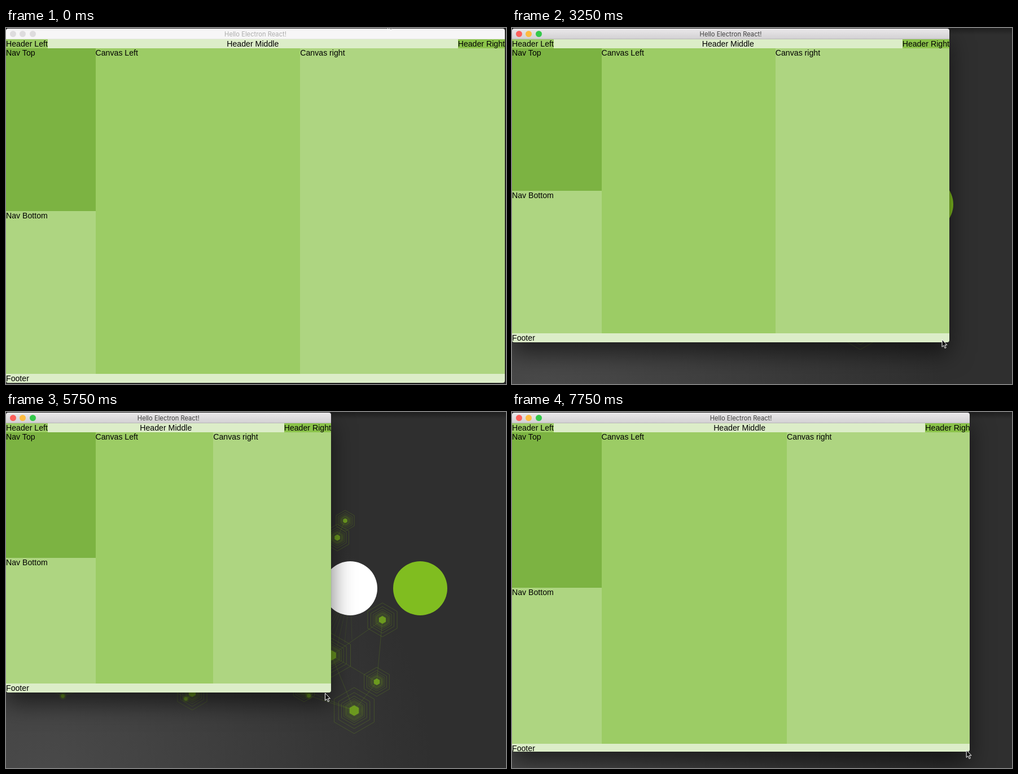
Animation of 886 by 632 pixels, one loop 8 s. Source, as an HTML page with a canvas:

```html
<!DOCTYPE html>
<html lang="en">
<head>
<meta charset="utf-8">
<title>Resizable layout</title>
<style>
  html, body { margin: 0; width: 100%; height: 100%; overflow: hidden; background: #2f2f2f; }
  #stage { position: relative; width: 886px; height: 632px; overflow: hidden; }
  #desktop, #cursor { position: absolute; left: 0; top: 0; }
  #cursor { overflow: visible; }
  #window {
    position: absolute; left: 0; top: 1px; overflow: hidden; border-radius: 4px;
    box-shadow: 0 20px 42px rgba(0,0,0,.55), 0 0 1px rgba(0,0,0,.6);
  }
  #title {
    position: absolute; left: 0; top: 0; width: 100%; height: 19px; box-sizing: border-box;
    background: linear-gradient(#ebe9eb, #d3d1d3); border-bottom: 1px solid #b9b7b9;
    font: 11.2px/20px Inter, sans-serif; color: #3c3c3c; text-align: center; white-space: nowrap;
  }
  #title i { position: absolute; top: 4px; width: 11px; height: 11px; border-radius: 50%; }
  .inactive #title { background: #f7f6f7; border-color: #e4e6e0; color: #acacac; }
  .inactive #title i { background: #dedcde !important; }
  #content {
    position: absolute; left: 0; top: 19px; display: flex; flex-direction: column;
    font: 14.15px/16px "Liberation Sans", Arial, sans-serif; color: #000; white-space: nowrap;
  }
  #header, #main { display: flex; }
  #header, #footer { flex: 0 0 16px; background: #dcedc8; }
  #main { flex: 1; }
  #nav { flex: 0 0 158.5px; display: flex; flex-direction: column; }
  .grow { flex: 1 1 0; }
  .c300 { background: #aed581; }
  .c400 { background: #9ccc65; }
  .c500 { background: #8bc34a; }
  .c600 { background: #7cb342; }
</style>
</head>
<body>
<div id="stage">
  <canvas id="desktop" width="886" height="632"></canvas>
  <div id="window">
    <div id="title">
      <i style="left:6.5px;background:#fc605b"></i>
      <i style="left:24px;background:#fdbc40"></i>
      <i style="left:42px;background:#34c84a"></i>
      Hello Electron React!
    </div>
    <div id="content">
      <div id="header">
        <div class="c400">Header Left</div>
        <div class="grow" style="text-align:center">Header Middle</div>
        <div class="c500">Header Right</div>
      </div>
      <div id="main">
        <div id="nav">
          <div class="grow c600">Nav Top</div>
          <div class="grow c300">Nav Bottom</div>
        </div>
        <div class="grow c400">Canvas Left</div>
        <div class="grow c300">Canvas right</div>
      </div>
      <div id="footer">Footer</div>
    </div>
  </div>
  <svg id="cursor" width="12" height="18">
    <path d="M.5 .5V13.6L3.4 10.9 5.5 15.8 7.6 14.9 5.5 10.1H9.4Z" fill="#111" stroke="#fff" stroke-width="1"/>
  </svg>
</div>
<script>
const $ = id => document.getElementById(id);
const ctx = $('desktop').getContext('2d');
const LOOP = 8000, STEP = 250, ACTIVATE = 1000, GRAB = 2250;
const LEAD = 30; // ms by which pointer and content run ahead of the window frame

// Key points: time, x, y
const pointerPath = [[0, 676, -13], [500, 798, 257], [1000, 798, 257], [2000, 872, 640]];
const cornerPath = [
  [2540, 884, 630], [2750, 852, 612], [3250, 775, 557.5], [3750, 734, 543],
  [4550, 734, 543], [4750, 698.5, 521.5], [5250, 567, 422], [6250, 584, 574], [LOOP, 849, 608]
];

function along(path, t) {
  const next = path.findIndex(key => key[0] > t);
  if (next <= 0) return path.at(next).slice(1);
  const [t0, x0, y0] = path[next - 1], [t1, x1, y1] = path[next];
  const k = (t - t0) / (t1 - t0);
  return [x0 + (x1 - x0) * k, y0 + (y1 - y0) * k];
}

const noise = k => Math.abs(Math.sin(k * 12.99 + 4) * 43758.5) % 1;

function hexagon(x, y, r) {
  ctx.beginPath();
  for (let k = 0; k < 6; k++) {
    const a = Math.PI / 6 + k * Math.PI / 3;
    ctx.lineTo(x + r * Math.cos(a), y + r * Math.sin(a));
  }
  ctx.closePath();
}

function line(x1, y1, x2, y2) {
  ctx.beginPath();
  ctx.moveTo(x1, y1);
  ctx.lineTo(x2, y2);
  ctx.stroke();
}

function disc(x, y, r, color) {
  ctx.fillStyle = color;
  ctx.beginPath();
  ctx.arc(x, y, r, 0, 2 * Math.PI);
  ctx.fill();
}

function gradientFill(gradient, from, to) {
  gradient.addColorStop(0, from);
  gradient.addColorStop(1, to);
  ctx.fillStyle = gradient;
}

function drawNode([x, y, r], ringed) {
  const glow = ringed ? .3 : .5;
  gradientFill(ctx.createRadialGradient(x, y, r * .6, x, y, r * 2), `rgba(110,165,20,${glow})`, 'rgba(110,165,20,0)');
  ctx.fillRect(x - 2 * r, y - 2 * r, 4 * r, 4 * r);
  ctx.strokeStyle = 'rgba(115,160,25,.4)';
  for (let k = 0; k < 6 && ringed; k++) {
    hexagon(x, y, r * (1 + 3.3 * .72 ** k));
    ctx.stroke();
  }
  ctx.fillStyle = '#6c9a1f';
  hexagon(x, y, r);
  ctx.fill();
}

function drawDesktop() {
  gradientFill(ctx.createRadialGradient(60, 680, 0, 60, 680, 700), '#4b4b4b', '#2f2f2f');
  ctx.fillRect(0, 0, 886, 632);
  gradientFill(ctx.createLinearGradient(0, 0, 0, 12), 'rgba(0,0,0,.35)', 'rgba(0,0,0,0)');
  ctx.fillRect(0, 0, 886, 12);

  const hubs = [
    [330, 499, 7], [528, 493, 5], [577, 432, 9], [657, 479, 6],
    [617, 530, 9.5], [667, 369, 7], [587, 223, 5.5], [601, 193, 4.3]
  ];
  const dots = Array.from({ length: 12 }, (_, k) => [57 + k * 43.6, 440 + 80 * noise(k), 3 + 2 * noise(k + 20)]);
  const nodes = [...hubs, ...dots];

  ctx.lineWidth = .7;
  ctx.strokeStyle = 'rgba(112,160,25,.35)';
  nodes.forEach(([x, y], i) => {
    for (const [x2, y2] of nodes.slice(i + 1)) {
      if (Math.hypot(x - x2, y - y2) < 112) line(x, y, x2, y2);
    }
  });
  ctx.strokeStyle = 'rgba(130,190,25,.75)';
  for (let k = -8; k <= 8; k++) line(357, 459, 357 + k * 11, 370);
  ctx.strokeStyle = 'rgba(112,160,25,.2)';
  for (let k = 0; k < 7; k++) line(610, 313, 535 + k * 13, 440 - k * 6);

  hubs.forEach(hub => drawNode(hub, true));
  [...dots, [357, 459, 9]].forEach(dot => drawNode(dot, false));
  disc(610, 313, 48, '#fff');
  disc(734, 313, 48, '#80bd20');
}

function render(now) {
  const t = Math.floor(now % LOOP / STEP) * STEP;
  const [right, bottom] = along(cornerPath, t);
  const [aheadX, aheadY] = along(cornerPath, t + LEAD);
  const stretch = Math.max(0, aheadX - right);
  const [x, y] = t < GRAB ? along(pointerPath, t) : [aheadX - 11, aheadY - 4];

  $('window').className = t < ACTIVATE ? 'inactive' : '';
  $('window').style.width = right + 'px';
  $('window').style.height = bottom - 1 + 'px';
  $('content').style.width = right + stretch + 'px';
  $('content').style.height = bottom - 20 + stretch * .4 + 'px';
  $('cursor').style.transform = `translate(${x}px, ${y}px)`;
}

drawDesktop();
const start = performance.now();
function tick() {
  render(performance.now() - start);
  requestAnimationFrame(tick);
}
tick();
</script>
</body>
</html>
```
